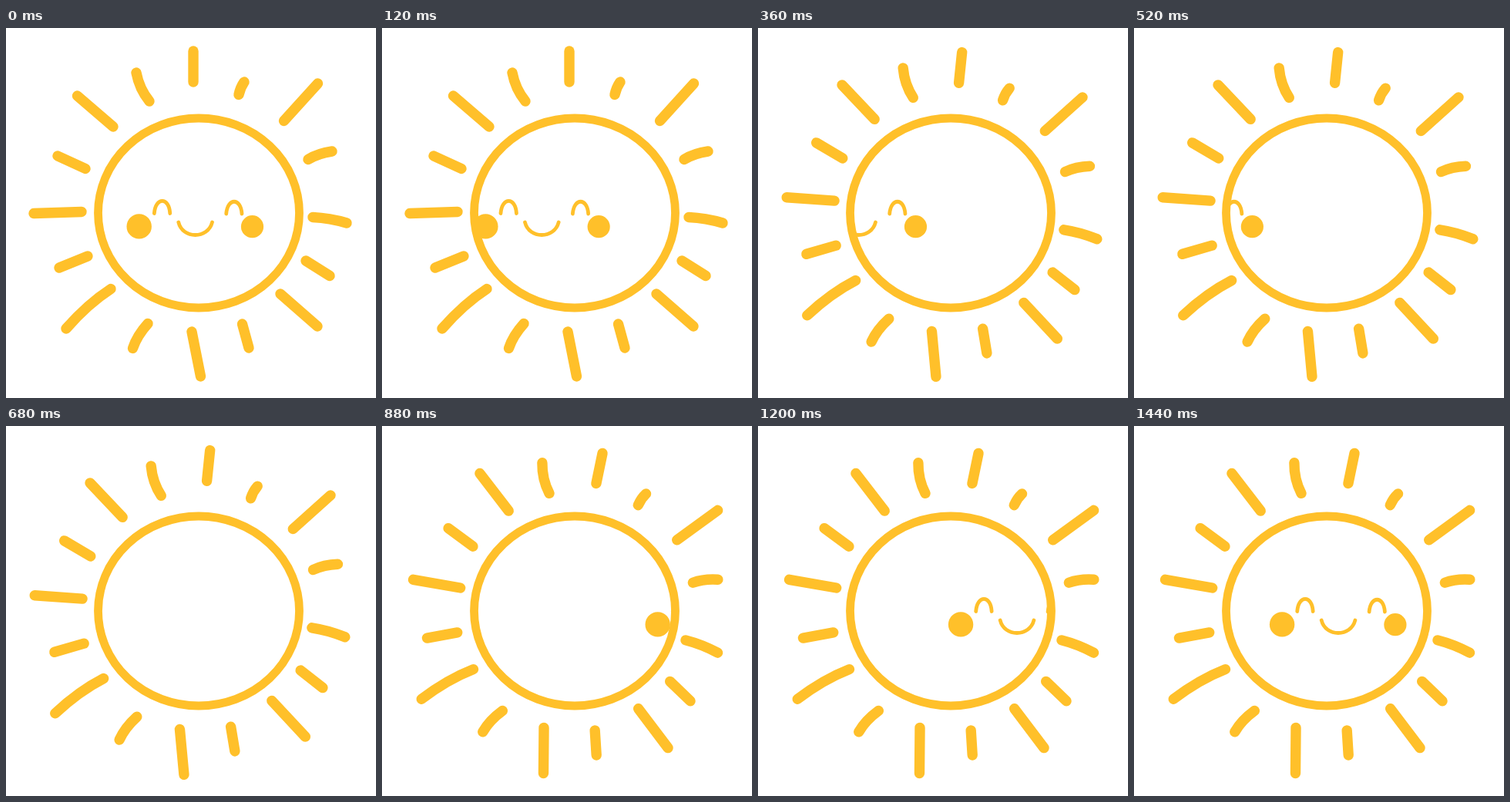
An HTML page that plays this animation: 480 by 480 pixels, repeating every 1.48 s.

```html
<!DOCTYPE html>
<html lang="en">
<head>
<meta charset="utf-8">
<title>Smiling sun</title>
<style>
  html, body { margin: 0; width: 100%; height: 100%; overflow: hidden; background: #fff; }
  svg { display: block; width: 100%; height: 100%; }
</style>
</head>
<body>
<svg viewBox="0 0 480 480" fill="none" stroke="#ffc02a" stroke-linecap="round">
  <clipPath id="disc"><ellipse cx="250" cy="240" rx="130.5" ry="123"/></clipPath>
  <g id="rays" stroke-width="13.4">
    <path d="M243 30V70"/>
    <path d="M169 58Q173 79 186 95"/>
    <path d="M92.5 88L139 128"/>
    <path d="M67 166L103 182.500"/>
    <path d="M36 240.500L98 238.500"/>
    <path d="M69 311L106 296"/>
    <path d="M78 390Q106 358 136 338.500"/>
    <path d="M164.500 415.500Q170 399 184 383.500"/>
    <path d="M241 394L252.500 452"/>
    <path d="M306.500 384L315 415"/>
    <path d="M356 345L404 387"/>
    <path d="M389 302L420 321.500"/>
    <path d="M398 245.500Q420 246.500 442 253"/>
    <path d="M392 170.500Q405 162.500 423 160"/>
    <path d="M360.500 120.500L404.500 72"/>
    <path d="M302 86.500Q304 77 309 70"/>
  </g>
  <g clip-path="url(#disc)">
    <g id="face" stroke-width="4.8">
      <g fill="#ffc02a" stroke="none">
        <circle cx="172.700" cy="257.400" r="16.200"/>
        <circle cx="319.500" cy="257.700" r="14.600"/>
      </g>
      <path d="M192.300 240.500C194 219 211.500 219 212.800 240.500"/>
      <path d="M285.700 241C287.500 220 304.500 220 306 241"/>
      <path d="M223.800 252C229 274 262 274 267.500 252"/>
    </g>
  </g>
  <ellipse cx="250" cy="240" rx="130.5" ry="123" stroke-width="10.8"/>
</svg>
<script>
  const LOOP = 1480, STEP = 40;
  const rays = document.getElementById('rays');
  const face = document.getElementById('face');

  // The face leaves on the left, then comes back in from the right.
  const faceX = t => t < 740 ? -0.3195 * t : 19.4 + 0.2957 * (1440 - t);
  const pose = t => t < 360 ? 0 : t < 880 ? 1 : 2;

  function draw(ms) {
    const t = Math.floor((ms % LOOP) / STEP) * STEP;
    rays.setAttribute('transform', `rotate(${5.87 * pose(t)} 238.5 242)`);
    face.setAttribute('transform', `translate(${faceX(t).toFixed(2)} 0)`);
  }

  const start = performance.now();
  function tick() {
    draw(performance.now() - start);
    requestAnimationFrame(tick);
  }
  draw(0);
  requestAnimationFrame(tick);
</script>
</body>
</html>
```
